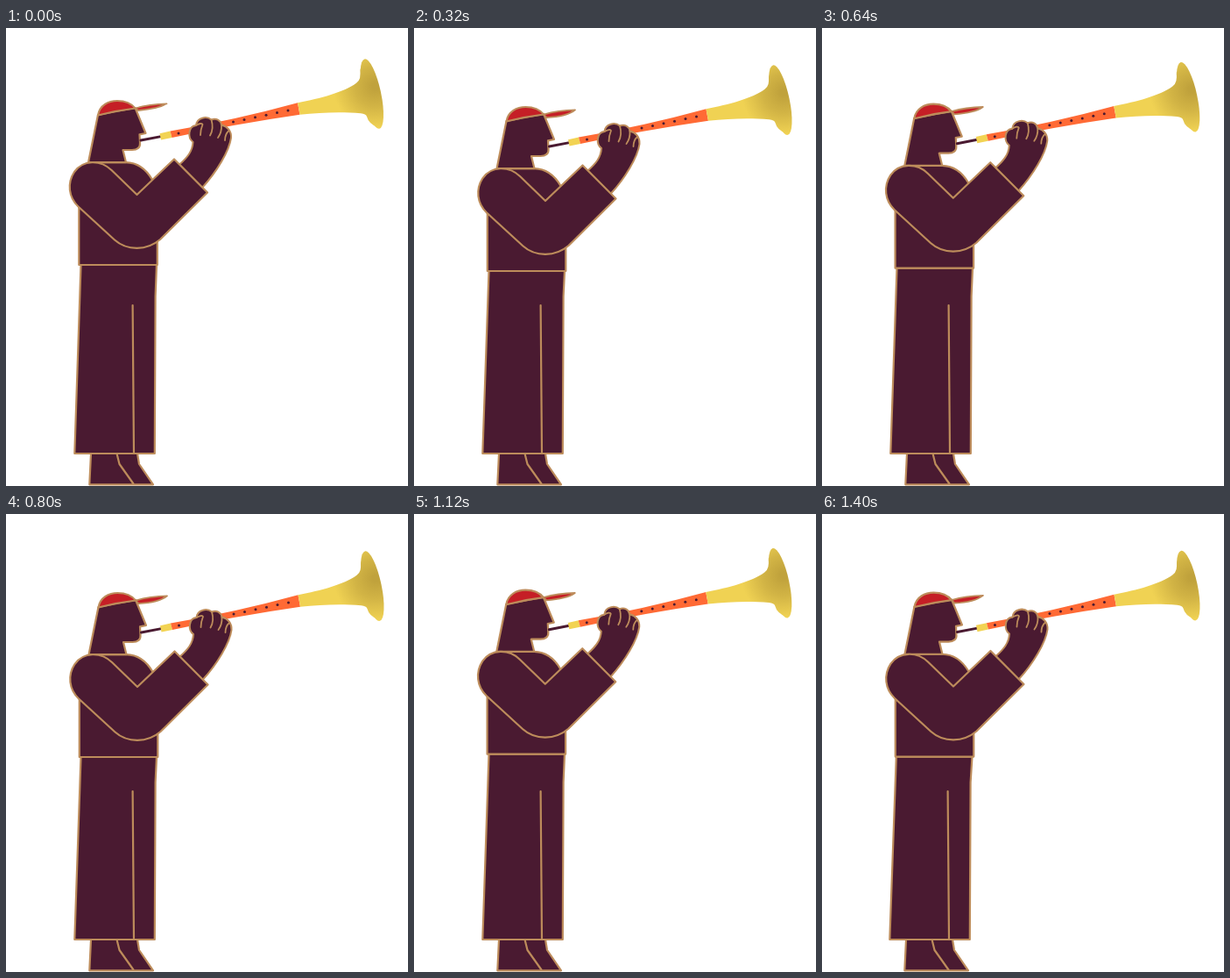
These frames come from a looping animation (459x522 px, 1.44 s). An HTML page with a canvas:

```html
<!DOCTYPE html>
<html lang="en">
<head>
<meta charset="utf-8">
<title>Horn player</title>
<style>
  html, body { margin: 0; width: 100%; height: 100%; overflow: hidden; background: #fff; }
  canvas { display: block; }
</style>
</head>
<body>
<canvas id="stage" width="459" height="522"></canvas>
<script>
const ctx = document.getElementById('stage').getContext('2d');
const STEP = 40, CYCLE = 12;
const SKIN = '#4a1a31', LINE = '#bd8c5b', RED = '#c51f26', ORANGE = '#ff6a35', GOLD = '#f2d353';

ctx.lineJoin = 'round';
ctx.lineCap = 'round';

function shape(d, fill, stroke = LINE, width = 2.2) {
  const path = new Path2D(d);
  if (fill) {
    ctx.fillStyle = fill;
    ctx.fill(path);
  }
  if (stroke) {
    ctx.strokeStyle = stroke;
    ctx.lineWidth = width;
    ctx.stroke(path);
  }
}

function drawLegs(drop, shift) {
  ctx.save();
  ctx.translate(shift, 0);
  shape('M97 485L95.3 520.3H168L152 497L150 485Z', SKIN);
  shape('M126.5 485L129.5 497L145.5 519.5');
  const waist = 270 + drop;
  shape(`M${85.5 - shift * 0.3} ${waist}H${172 - shift * 0.5}L170.6 306L169.8 485H78.3Z`, SKIN);
  shape('M144.6 316L146 485');
  ctx.restore();
}

function drawTorso() {
  shape('M83.3 195V270H172.8V236L167 173C160 161 150 153.5 137 153.2H100Z', SKIN);
}

function drawHead(lift) {
  shape('M105 99L94 153.2H137L133.5 139H144C150 139 153.5 136 153 131L152.5 121.3L159.5 120L147.5 91Z', SKIN);
  shape('M105 99.5C107 88 117 83 127 83C137 83 144 87 147.5 91.5Q126 94 105 99.5Z', RED);
  const fat = lift * 0.3;
  shape(`M147.5 91.5Q164 86.5 183.5 86.3Q174 ${92 + fat} 151 ${94 + fat * 0.5}Z`, RED, LINE, 1.8);
}

function drawHorn() {
  shape('M154 128L177 123.6', null, SKIN, 3);
  shape('M175.5 120.2L187.5 117.6L189.5 125L177 127.6Z', GOLD, null);
  shape('M187.5 117.6Q262 104.6 333 85.2L335.5 98.8Q262 109.4 189.5 125Z', ORANGE, null);

  ctx.fillStyle = SKIN;
  for (const x of [197, 259.5, 272, 284.5, 297, 309.5, 322]) {
    ctx.beginPath();
    ctx.arc(x, 120 - (x - 197) * 0.208, 1.5, 0, 7);
    ctx.fill();
  }

  const shine = ctx.createRadialGradient(422, 66, 4, 420, 68, 46);
  shine.addColorStop(0, '#c0a23c');
  shine.addColorStop(0.45, '#d2b445');
  shine.addColorStop(1, '#f0d253');
  shape('M333 85.2C359 80.5 386 73 400 62.8Q406 59 404.5 46L424 113Q414 109 412 101Q411 98 405 97.3C385 95.5 360 96 335.5 98.8Z', shine, null);
  ctx.beginPath();
  ctx.ellipse(417.8, 75.1, 10.4, 40.6, -0.21, 0, 7);
  ctx.fill();
}

function drawArm() {
  shape('M198 155.5C207 147.5 213 140.5 213.5 130C207 125 208 112 217 111C218 102 229 100 234.5 104.5C240 102.5 245 105 246 110.5C253 112 257.5 118 257 125C255 140 240.5 164 224 182Z', SKIN, LINE, 2);
  shape('M217 111C220 109 224 108 224.5 110Q222 116 222 122M234.5 104.5Q237.5 115 233 122.5M246 110.5Q246.5 119 242 125M254.5 117Q250 121 250 128', null, LINE, 1.8);
  shape('M149.5 190L120.5 162C108 150 88 150 78 164C69.5 177 71.5 193 82.5 203.5L124 241.5C138 254 161 254 176 241L230 187.5L192 149.5Z', SKIN);
}

function draw(now) {
  const frame = Math.floor(now / STEP) % CYCLE;
  // A cosine bob that is cut short and snaps back each cycle.
  const swing = angle => Math.cos(angle * Math.PI / 180);
  const drop = 3.8 * (swing(17 * (frame - 9)) - swing(153));

  ctx.fillStyle = '#fff';
  ctx.fillRect(0, 0, 459, 522);
  drawLegs(drop, -Math.max(0, frame - 8) / 3);
  ctx.save();
  ctx.translate(drop * 0.07, drop);
  drawTorso();
  drawHead(drop);
  drawHorn();
  drawArm();
  ctx.restore();
  requestAnimationFrame(draw);
}

requestAnimationFrame(draw);
</script>
</body>
</html>
```
